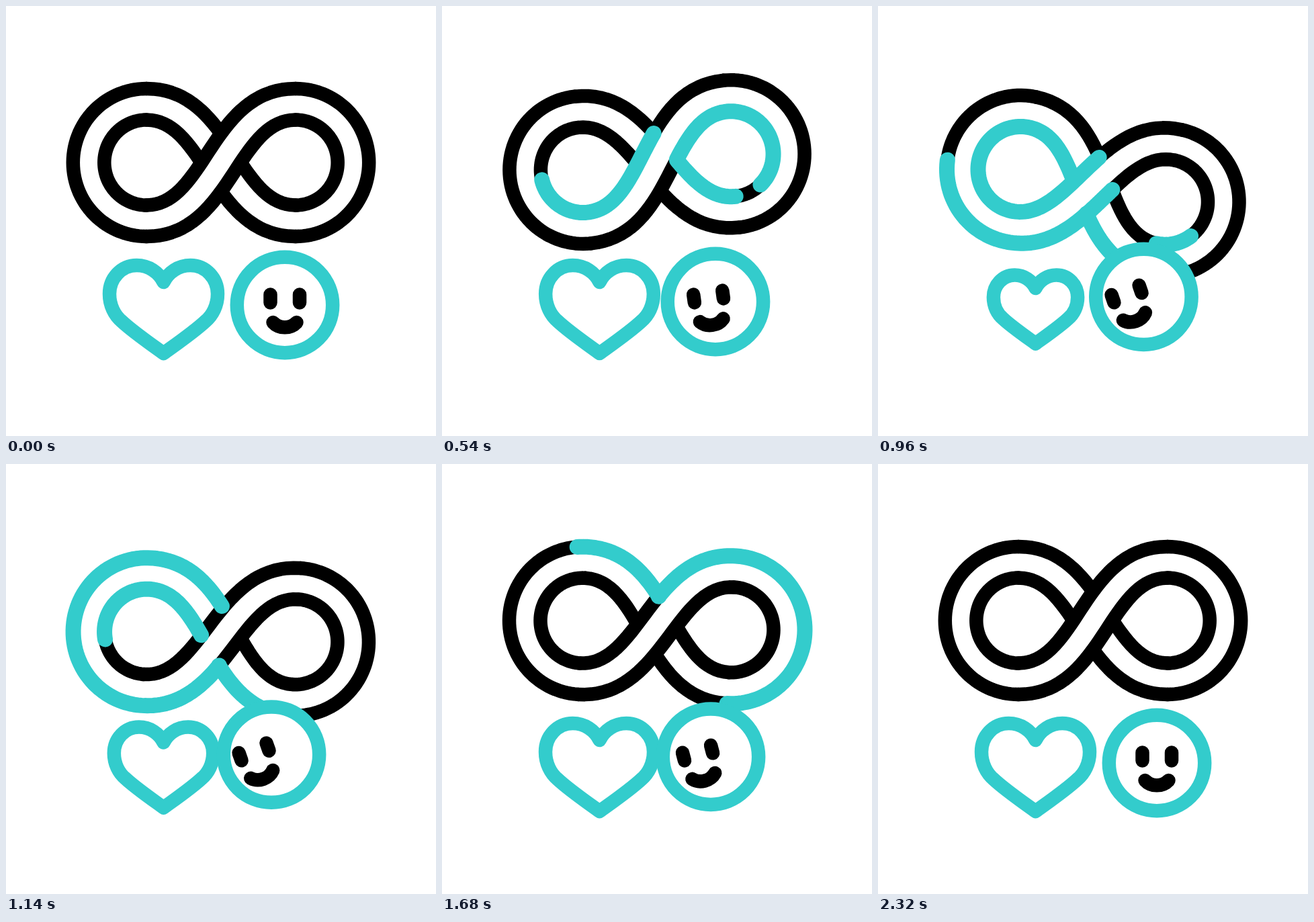
Write an HTML page with a canvas that moves like this. It is 640x640 px and loops after 2400 ms.

```html
<!DOCTYPE html>
<html lang="en">
<head>
<meta charset="utf-8">
<title>Infinity, heart and smile</title>
<style>
  html, body { margin: 0; width: 100%; height: 100%; overflow: hidden; background: #fff; }
  canvas { display: block; width: 100vmin; height: 100vmin; }
</style>
</head>
<body>
<canvas id="stage" width="640" height="640"></canvas>
<script>
const ctx = document.getElementById('stage').getContext('2d');
const LOOP = 2400, TEAL = '#33cccc', BLACK = '#000';

// ---- timing ----
const clamp = u => Math.min(1, Math.max(0, u));
const ramp = (t, from, to) => clamp((t - from) / (to - from));
const smooth = u => u * u * (3 - 2 * u);
const cubic = u => u < 0.5 ? 4 * u ** 3 : 1 - 4 * (1 - u) ** 3;
const easeOut = (u, power) => 1 - (1 - u) ** power;

function track(keys, t) {
  for (let i = 1; i < keys.length; i++) {
    const [t0, a] = keys[i - 1], [t1, b] = keys[i];
    if (t < t1) return a + (b - a) * smooth(ramp(t, t0, t1));
  }
  return keys[keys.length - 1][1];
}

const heartScale = [[0, 1], [340, .755], [700, 1.172], [1000, .758], [1333, 1.17], [1667, 1]];
const bandY = [[0, 0], [340, 51], [700, -38], [1000, 38], [1400, -11], [1690, 7], [2160, 0]];
const bandTilt = [[0, 0], [320, -14.6], [920, 13.1], [1450, -11.5], [1760, 6.5], [2160, 0]];

// ---- infinity geometry, centred on the origin ----
const CX = 111, OUTER = 110, INNER = 63.5;
const T_B = .424, T_V = .592;  // where the edges cross

// Lower edge of the front strand, from the left outer bottom to the right inner top.
function edgePoint(t) {
  const s = 1 - t;
  const a = s ** 3, b = 3 * s * s * t, c = 3 * s * t * t, d = t ** 3;
  return [-CX * a + 14 * b + 23 * c + CX * d, OUTER * (a + b) - INNER * (c + d)];
}

const sample = (n, f) => Array.from({ length: n + 1 }, (_, i) => f(i / n));
const edge = (from, to) => sample(36, u => edgePoint(from + (to - from) * u));
const flip = (pts, sx, sy) => pts.map(([x, y]) => [x * sx, y * sy]);
const reverse = pts => [...pts].reverse();
const arc = (cx, r, from, to) => sample(60, u => {
  const a = (from + (to - from) * u) * Math.PI / 180;
  return [cx + (r - .8) * Math.cos(a), r * Math.sin(a)];
});

const frontLower = edge(0, 1), frontUpper = flip(frontLower, -1, -1);
const backLower = flip(frontLower, -1, 1), backUpper = flip(frontLower, 1, -1);
const leftOuter = arc(-CX, OUTER, 90, 270), leftInner = arc(-CX, INNER, 90, 270);
const rightOuter = arc(CX, OUTER, -90, 90), rightInner = arc(CX, INNER, -90, 90);

const toB = edge(0, T_B), fromV = edge(T_V, 1);
const silhouette = [
  ...flip(toB, -1, 1), ...reverse(toB), ...leftOuter,
  ...flip(toB, 1, -1), ...reverse(flip(toB, -1, -1)), ...rightOuter
];
const rightDrop = [...reverse(flip(fromV, 1, -1)), ...fromV, ...rightInner];
const leftDrop = [...flip(edge(T_B, 1), -1, -1), ...leftInner, ...reverse(flip(fromV, -1, 1))];
const bridge = edge(T_V, T_B - .014);

// ---- drawing ----
function trace(pts) {
  ctx.beginPath();
  pts.forEach(([x, y]) => ctx.lineTo(x, y));
}

function stroke(color, width) {
  ctx.strokeStyle = color;
  ctx.lineWidth = width;
  ctx.stroke();
}

function line(pts) {
  trace(pts);
  stroke(BLACK, 20.5);
}

// Strokes only the part of the path between two fractions of its length.
function trimmed(pts, tail, head) {
  if (head - tail < .001) return;
  const at = [0];
  for (let i = 1; i < pts.length; i++) {
    at.push(at[i - 1] + Math.hypot(pts[i][0] - pts[i - 1][0], pts[i][1] - pts[i - 1][1]));
  }
  const total = at[at.length - 1], lo = tail * total, hi = head * total, part = [];
  for (let i = 1; i < pts.length; i++) {
    const len = at[i] - at[i - 1];
    if (len === 0 || at[i] < lo || at[i - 1] > hi) continue;
    const mix = d => pts[i].map((v, k) => pts[i - 1][k] + (v - pts[i - 1][k]) * d);
    if (!part.length) part.push(mix(clamp((lo - at[i - 1]) / len)));
    part.push(mix(clamp((hi - at[i - 1]) / len)));
  }
  trace(part);
  stroke(TEAL, 23);
}

function drawInfinity(t) {
  ctx.save();
  ctx.translate(320, 233 + track(bandY, t));
  ctx.rotate(track(bandTilt, t) * Math.PI / 180);
  [backLower, backUpper].forEach(line);
  trace([...frontLower, ...frontUpper]);
  ctx.fillStyle = '#fff';
  ctx.fill();
  [frontLower, frontUpper, leftOuter, leftInner, rightOuter, rightInner].forEach(line);

  trimmed(rightDrop, ramp(t, 640, 1008), ramp(t, 0, 600));
  trimmed(leftDrop, ramp(t, 965, 1300), ramp(t, 330, 720));
  trimmed(bridge, ramp(t, 965, 1150), ramp(t, 600, 720));
  trimmed(silhouette, easeOut(ramp(t, 1320, 2320), 1.5), easeOut(ramp(t, 734, 1505), 1.25));
  ctx.restore();
}

function heartPath(s) {
  const p = new Path2D();
  const half = side => (...v) =>
    p.bezierCurveTo(...v.map((n, i) => i % 2 ? 451.5 + n * s : 234.5 + n * s * side));
  const left = half(-1), right = half(1);
  p.moveTo(234.5, 451.5 - 40.5 * s);
  left(7, -55, 22, -65.5, 40, -65.5);
  left(63, -65.5, 80.5, -46, 80.5, -23);
  left(80.5, -6, 73, 9, 62, 18);
  left(46, 33, 20, 51, 0, 65.5);
  right(20, 51, 46, 33, 62, 18);
  right(73, 9, 80.5, -6, 80.5, -23);
  right(80.5, -46, 63, -65.5, 40, -65.5);
  right(22, -65.5, 7, -55, 0, -40.5);
  p.closePath();
  return p;
}

function drawFeatures(x, y, turn) {
  ctx.save();
  ctx.translate(x, y);
  ctx.rotate(turn * Math.PI / 180);
  ctx.beginPath();
  for (const eye of [-21.5, 22]) {
    ctx.moveTo(eye, -15.5);
    ctx.lineTo(eye, -3.5);
  }
  ctx.moveTo(-17.5, 26);
  ctx.bezierCurveTo(-8.5, 35.7, 8.5, 35.7, 17.5, 26);
  stroke(BLACK, 20.5);
  ctx.restore();
}

function drawPair(t) {
  const look = cubic(ramp(t, 0, 1160)) - cubic(ramp(t, 1260, 2320));
  const x = 415 - 20 * look, y = 445 - 12.4 * look;
  const heart = heartPath(track(heartScale, t));
  const face = new Path2D();
  face.arc(x, y, 71.2, 0, 2 * Math.PI);
  ctx.fillStyle = '#fff';
  ctx.strokeStyle = TEAL;
  ctx.lineWidth = 20.5;
  ctx.fill(heart);
  ctx.fill(face);
  ctx.stroke(heart);
  ctx.stroke(face);
  drawFeatures(x - 23 * look, y + 4.8 * look, -19.6 * look);
}

function draw(now) {
  const t = now % LOOP;
  ctx.fillStyle = '#fff';
  ctx.fillRect(0, 0, 640, 640);
  ctx.lineCap = ctx.lineJoin = 'round';
  drawInfinity(t);
  drawPair(t);
}

let start;
function tick(now) {
  start ??= now;
  draw(now - start);
  requestAnimationFrame(tick);
}
draw(0);
requestAnimationFrame(tick);
</script>
</body>
</html>
```
